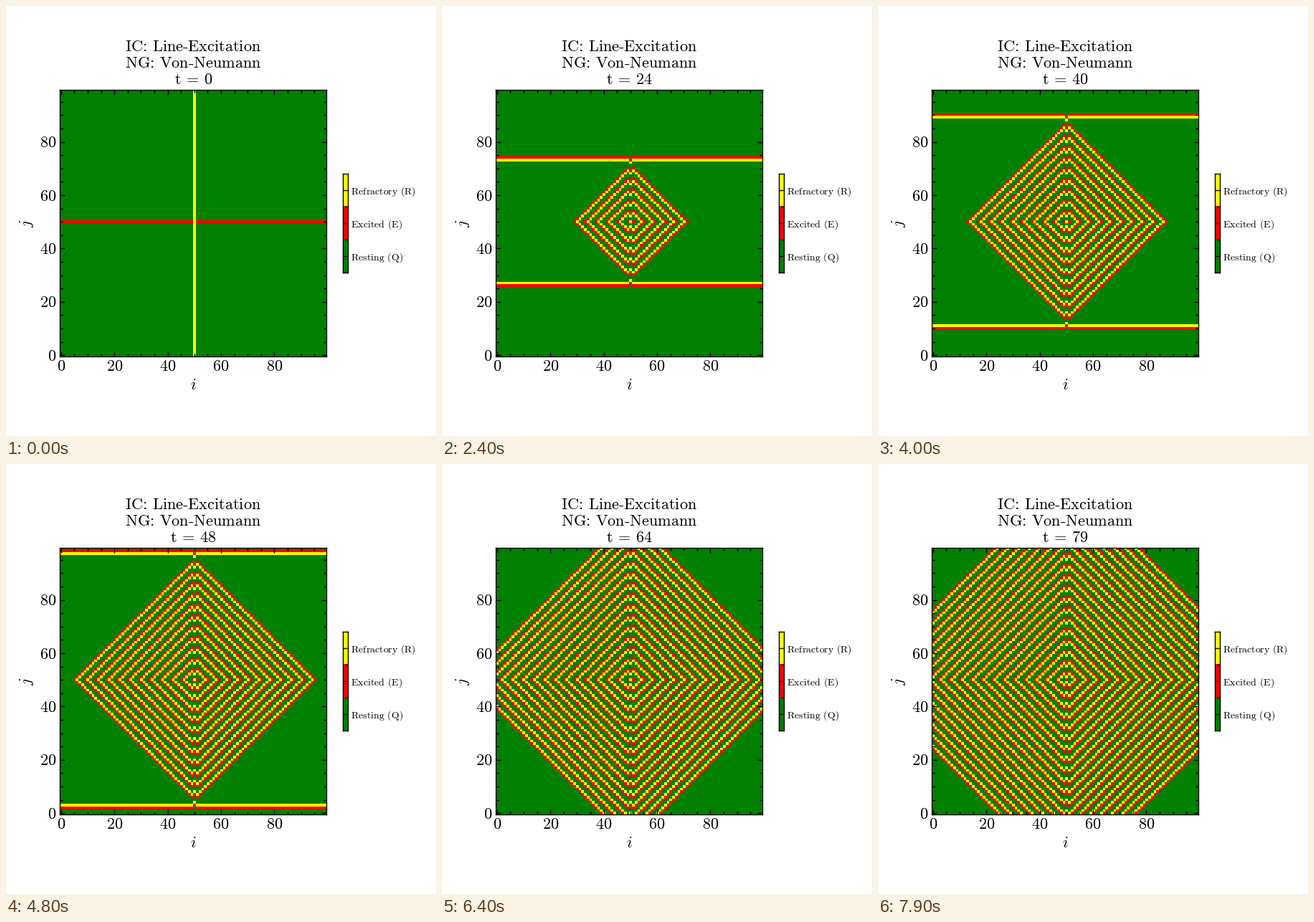
A matplotlib script that plays this animation: 600x600 px, repeating every 8000 ms.

```python
import numpy as np
import matplotlib.pyplot as plt
from matplotlib.animation import FuncAnimation
from matplotlib.colors import ListedColormap

plt.rcParams["mathtext.fontset"] = "cm"
plt.rcParams["axes.linewidth"] = 1.0

SIZE, N, STEPS = 600, 100, 80
REST, EXCITED, REFRACTORY = 0, 1, 2
CMAP = ListedColormap(["green", "red", "yellow"])
LEFT, BOTTOM = 75, 111
SIDE = 372.001  # just over a whole pixel, so the image rounds up to 373
CELL = SIDE / N
BAR = (470.25, 227.7, 6.93, 138.6)


def evolve(grid):
    """One step of the excitable medium with four neighbours per cell."""
    hot = np.pad(grid == EXCITED, 1)
    near = hot[:-2, 1:-1] | hot[2:, 1:-1] | hot[1:-1, :-2] | hot[1:-1, 2:]
    new = np.where((grid == REST) & near, EXCITED, REST)
    new[grid == EXCITED] = REFRACTORY
    return new


def simulate():
    grid = np.full((N, N), REST)
    grid[N // 2, :] = EXCITED
    grid[:, N // 2] = REFRACTORY
    states = [grid]
    for _ in range(STEPS - 1):
        states.append(evolve(states[-1]))
    return states


def roman(s):
    return r"$\text{" + s + "}$"


def prose(s, size=16):
    """Upright text led by half a pixel, so glyphs round to the nearest one."""
    em = 0.878 * size * 100 / 72
    return rf"$\hspace{{{0.5 / em:.4f}}}\text{{{s}}}$"


def label(x, y, s, size=16, ha="center", **kw):
    """Text with its baseline at pixel (x, y), y counted from the top."""
    return fig.text(x / SIZE, 1 - y / SIZE, s, fontsize=size,
                    ha=ha, va="baseline", **kw)


def add_axes(x, y, w, h):
    return fig.add_axes([v / SIZE for v in (x, y, w, h)])


def style_ticks(axes, **kw):
    axes.tick_params(which="both", direction="in", width=1.0, right=True,
                     labelbottom=False, labelleft=False, **kw)
    axes.tick_params(which="major", length=5)
    axes.tick_params(which="minor", length=3)


states = simulate()
fig = plt.figure(figsize=(6, 6), dpi=100, facecolor="white")

# Main panel
ax = add_axes(LEFT, BOTTOM, SIDE, SIDE)
image = ax.imshow(states[0], cmap=CMAP, vmin=0, vmax=2, origin="lower",
                  interpolation="nearest", aspect="auto")
major = range(0, N, 20)
minor = [v for v in range(0, N, 5) if v % 20]
for axis in (ax.xaxis, ax.yaxis):
    axis.set_ticks(major)
    axis.set_ticks(minor, minor=True)
style_ticks(ax, top=True)

for v in major:
    offset = (v + 0.5) * CELL
    label(LEFT + offset, 509, roman(str(v)))
    label(70.6, SIZE - BOTTOM - offset + 7.7, roman(str(v)), ha="right")

mid = LEFT + SIDE / 2
label(mid, 535.3, "$i$")
label(34.6, 303, "$j$", rotation=90, rotation_mode="anchor")
label(mid + 0.25, 63.3, prose("IC: Line-Excitation"))
label(mid + 0.25, 86.3, prose("NG: Von-Neumann"))
clock = label(mid + 0.25, 109.3, prose("t = 0"))

# Colour key
key = add_axes(*BAR)
key.imshow([[REST], [EXCITED], [REFRACTORY]], cmap=CMAP, origin="lower",
           extent=(0, 1, 0, 3), aspect="auto", interpolation="nearest")
key.set_xticks([])
key.set_yticks([0.5, 1.5, 2.5])
key.set_yticks([1, 2], minor=True)
style_ticks(key, left=False)
for k, name in enumerate(["Resting (Q)", "Excited (E)", "Refractory (R)"]):
    y = SIZE - BAR[1] - (k + 0.5) * BAR[3] / 3
    label(481, y + 5.5, prose(name, 10), size=10, ha="left")


def update(t):
    image.set_data(states[t])
    clock.set_text(prose(f"t = {t}"))
    return image, clock


anim = FuncAnimation(fig, update, frames=STEPS, interval=100,
                     repeat=True, repeat_delay=0, blit=False)
plt.show()
```
